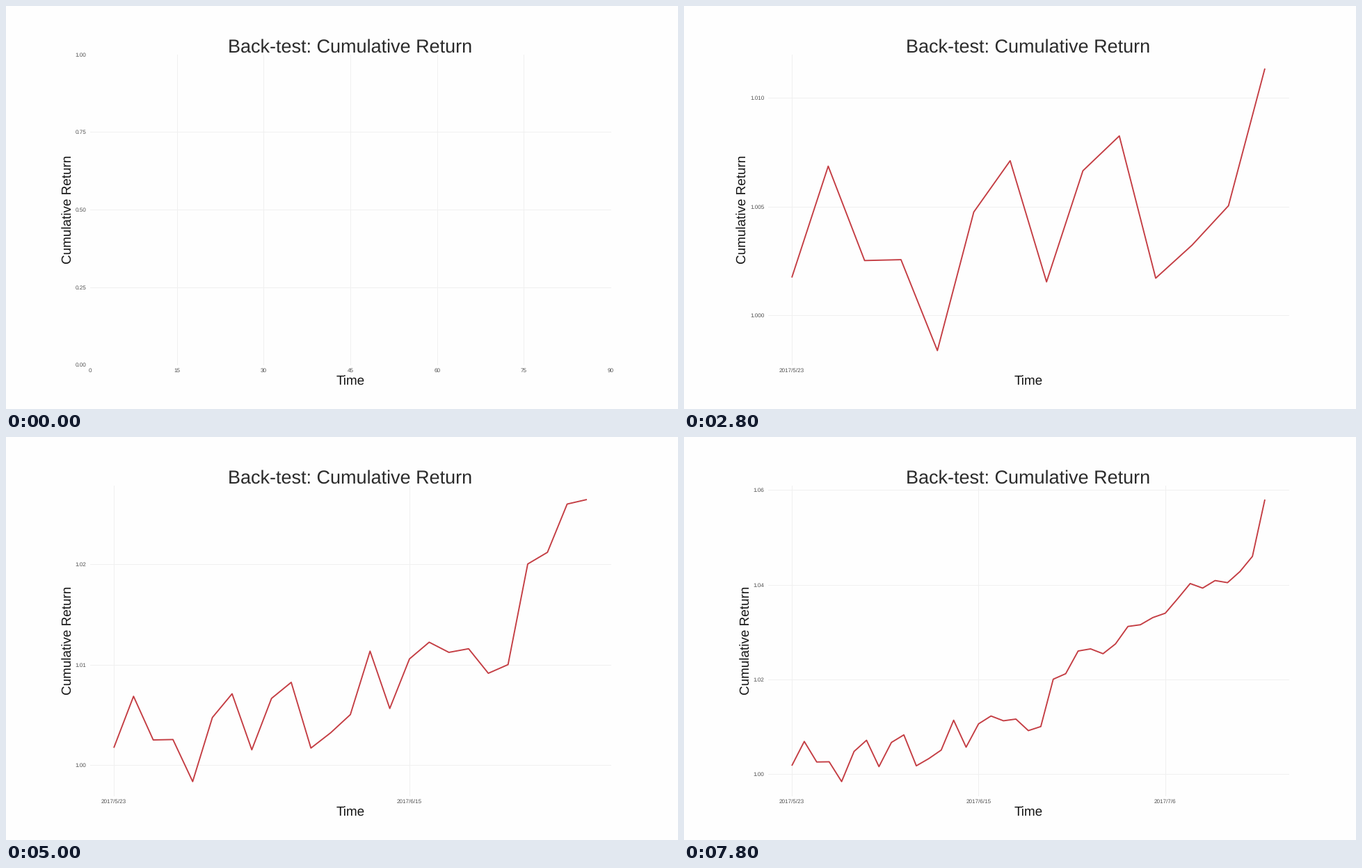
Write a matplotlib script that moves like this. It is 966 px wide and 580 px high and loops after 8000 ms.

```python
import math

import matplotlib.pyplot as plt
from matplotlib.animation import FuncAnimation

W, H, DPI = 966, 580, 100
PX = 72 / DPI                       # points per pixel
LEFT, RIGHT, TOP, BOTTOM = 121.0, 869.0, 69.7, 516.2
RED, GRID, TICK = "#c43d43", "#f0f0f0", "#505050"

plt.rcParams.update({
    "font.family": "Liberation Sans",
    "text.hinting": "none",
})

# Cumulative return of each trading day, in 1e-5 above 1
RETURNS = [
    174, 686, 252, 256, -162, 475, 711, 154, 665, 825,
    171, 323, 504, 1135, 565, 1058, 1224, 1123, 1159, 915,
    1001, 2002, 2118, 2598, 2643, 2541, 2748, 3117, 3153, 3305,
    3397, 3705, 4024, 3928, 4087, 4043, 4278, 4598, 5800,
]
VALUES = [1 + r * 1e-5 for r in RETURNS]
DATES = {0: "2017/5/23", 15: "2017/6/15", 30: "2017/7/6"}
TITLE_X = {2: 93.4, 3: 88.9, 4: 84.4}   # moves left as labels grow

fig = plt.figure(figsize=(W / DPI, H / DPI), dpi=DPI, facecolor="#fefefe")
ax = fig.add_axes([0, 0, 1, 1])


def expand(lo, hi):
    """Widen a data range by 5 % at each end."""
    if hi == lo:
        return lo - 0.5, hi + 0.5
    pad = 0.05 * (hi - lo)
    return lo - pad, hi + pad


def nice_step(span):
    raw = span / 4
    base = 10 ** math.floor(math.log10(raw))
    for m in (1, 2, 2.5, 5, 10):
        if m * base >= raw * (1 - 1e-9):
            return m * base


def decimals(step):
    d = 2
    while abs(step * 10 ** d - round(step * 10 ** d)) > 1e-6:
        d += 1
    return d


def label(x, y, text, px, color, **kw):
    kw = {"ha": "center", "va": "baseline", **kw}
    ax.text(x, y, text, fontsize=px * PX, color=color, **kw)


def grid(xs, ys):
    ax.plot(xs, ys, color=GRID, lw=1 * PX, zorder=1)


def draw(n):
    ax.clear()
    ax.set_xlim(0, W)
    ax.set_ylim(H, 0)
    ax.axis("off")

    if n:
        data = VALUES[:n]
        x0, x1 = expand(0, n - 1)
        y0, y1 = expand(min(data), max(data))
    else:
        data = []
        x0, x1, y0, y1 = 0, 90, 0, 1

    def sx(v):
        return LEFT + (v - x0) / (x1 - x0) * (RIGHT - LEFT)

    def sy(v):
        return BOTTOM - (v - y0) / (y1 - y0) * (BOTTOM - TOP)

    step = nice_step(y1 - y0)
    places = decimals(step)
    for k in range(math.ceil(y0 / step - 1e-9), math.floor(y1 / step + 1e-9) + 1):
        y = sy(k * step)
        if TOP + 0.5 < y < BOTTOM - 0.5:
            grid([LEFT, RIGHT], [y, y])
        label(115.6, y + 2.9, f"{k * step:.{places}f}", 8.1, TICK, ha="right")

    for i in range(0, 91, 15):
        if i > x1:
            break
        x = sx(i)
        if LEFT + 0.5 < x < RIGHT - 0.5:
            grid([x, x], [TOP, BOTTOM])
        if n == 0:
            label(x, 526.9, str(i), 8.1, TICK)
        elif i < n:
            label(x, 526.9, DATES[i], 8.1, TICK)

    if n > 1:
        ax.plot([sx(i) for i in range(n)], [sy(v) for v in data],
                color=RED, lw=1.9 * PX, zorder=2,
                solid_joinstyle="round", solid_capstyle="butt")

    label(494.8, 67, "Back-test: Cumulative Return", 27.05, "#2b2b2b")
    label(494.8, 544.7, "Time", 18.9, "#151515")
    label(TITLE_X[places], 293.3, "Cumulative Return", 18.9, "#151515",
          rotation=90, rotation_mode="anchor")
    return []


anim = FuncAnimation(fig, draw, frames=len(VALUES) + 1, interval=200,
                     init_func=lambda: [], repeat=True, repeat_delay=0)
plt.show()
```
